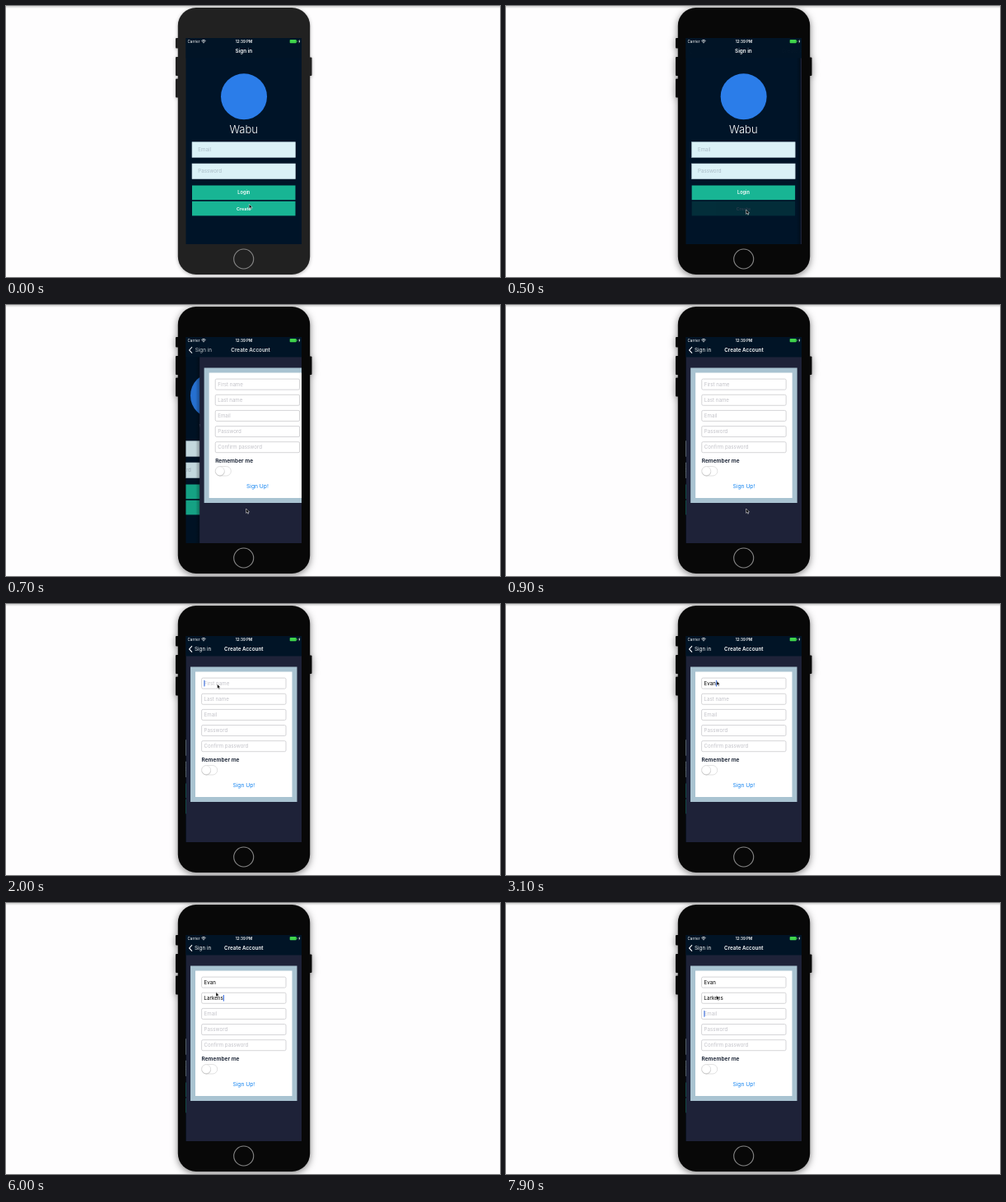
Recreate the animation shown at these times as an HTML page. Size 600 by 330 pixels, loop 8 s.

```html
<!DOCTYPE html>
<html lang="en">
<head>
<meta charset="utf-8">
<title>Sign up flow</title>
<style>
  html, body { margin: 0; width: 100%; height: 100%; overflow: hidden; background: #fefdfe; }
  svg { display: block; width: 100vw; height: 100vh; }
  text { font: 400 6.2px Inter, "Open Sans", sans-serif; }
  .mid { text-anchor: middle; }
  .bold { font-weight: 600; }
  .white { fill: #fff; }
  .hint { fill: #c2c2c8; }
  .status { font-size: 4.6px; fill: #fff; }
  .nav { font-size: 6.3px; fill: #fff; }
  .button { fill: #18b594; }
  .box { fill: #daf1f7; stroke: #b9cdd6; stroke-width: .6; }
  .input { fill: #fff; stroke: #c9c9cd; stroke-width: .8; }
  #phone { fill: #212121; filter: drop-shadow(0 1px 2px rgba(0,0,0,.3)); }
  #phone.active { fill: #080808; filter: drop-shadow(0 2px 4px rgba(0,0,0,.5)); }
</style>
</head>
<body>
<svg viewBox="0 0 600 330">
  <defs>
    <linearGradient id="top" x2="0" y2="1">
      <stop stop-color="#cfcfcf"/><stop offset="1" stop-color="#fefdfe"/>
    </linearGradient>
    <linearGradient id="edge">
      <stop stop-color="#000" stop-opacity="0"/><stop offset="1" stop-color="#000" stop-opacity=".3"/>
    </linearGradient>
    <clipPath id="screen"><rect x="218.5" y="39" width="140.5" height="251"/></clipPath>
  </defs>
  <rect width="600" height="3" fill="url(#top)"/>

  <g id="phone">
    <rect x="206" y="39" width="5" height="12.5" rx="1"/>
    <rect x="206" y="62" width="5" height="23" rx="1"/>
    <rect x="206" y="88.5" width="5" height="23" rx="1"/>
    <rect x="367" y="62.5" width="4.5" height="22.5" rx="1"/>
    <rect x="208.8" y="2" width="160.4" height="325" rx="22"/>
  </g>
  <circle cx="288.7" cy="308" r="12" fill="none" stroke="#858585" stroke-width="1.1"/>

  <g clip-path="url(#screen)">
    <g id="login">
      <rect x="218" y="39" width="142" height="252" fill="#001428"/>
      <circle cx="289" cy="110.3" r="28" fill="#2b7de9"/>
      <text class="mid white" x="288.7" y="155" style="font-size:13px;font-weight:300">Wabu</text>
      <rect class="box" x="226" y="165.7" width="125.5" height="18.6"/>
      <text x="233.3" y="177.2" fill="#a9bcc7">Email</text>
      <rect class="box" x="226" y="192" width="125.5" height="18.6"/>
      <text x="233.3" y="203.4" fill="#a9bcc7">Password</text>
      <rect class="button" x="226" y="218.5" width="125.5" height="17.6"/>
      <text class="mid bold white" x="288.8" y="229.3" style="font-size:5.6px">Login</text>
      <g id="create">
        <rect class="button" x="226" y="237.8" width="125.5" height="17.6"/>
        <text class="mid bold white" x="288.8" y="248.6" style="font-size:5.4px">Create</text>
      </g>
      <rect id="dim" x="218" y="39" width="142" height="252"/>
    </g>

    <g id="signup">
      <rect x="213.5" y="39" width="5" height="252" fill="url(#edge)"/>
      <rect x="218.5" y="39" width="142" height="252" fill="#1e2238"/>
      <rect x="224" y="76.5" width="129.5" height="164.5" fill="#a9c3d1"/>
      <rect x="230" y="82.5" width="117.5" height="152.5" fill="#fff"/>
      <g id="fields"></g>
      <rect id="caret" width="1.1" height="7.6" fill="#3a6fe2"/>
      <text class="bold" x="237.5" y="192.3" style="font-size:6.6px" fill="#101a2c">Remember me</text>
      <rect x="237.5" y="196.6" width="19.2" height="11.4" rx="5.7" fill="#fff" stroke="#dedede" stroke-width=".9"/>
      <circle cx="243.4" cy="202.9" r="5.6" fill="#000" opacity=".2"/>
      <circle cx="243.2" cy="202.2" r="5.4" fill="#fff" stroke="#d0d0d0" stroke-width=".4"/>
      <text class="mid" x="288.8" y="223" style="font-size:6.7px" fill="#1283f0">Sign Up!</text>
    </g>

    <rect x="218" y="39" width="142" height="24.5" fill="#011426"/>
    <text id="title" class="nav mid bold" x="288.8" y="57.3">Sign in</text>
    <path id="arrow" d="M226 51.2 L222.6 54.9 L226 58.6" fill="none" stroke="#fff" stroke-width="1.1"/>
    <text id="back" class="nav" x="229" y="57.3">Sign in</text>
    <text id="next" class="nav mid bold" x="288.8" y="57.3">Create Account</text>

    <text class="status" x="220.5" y="44.7">Carrier</text>
    <g fill="none" stroke="#fff" stroke-width=".8">
      <path d="M237.4 42.4 Q240 40.2 242.6 42.4 M238.4 43.6 Q240 42.3 241.6 43.6"/>
    </g>
    <circle class="white" cx="240" cy="44.7" r=".6"/>
    <text class="status mid bold" x="289" y="44.8">12:39 PM</text>
    <rect x="344.7" y="41" width="8" height="4.2" rx=".8" fill="#3fd44b"/>
    <rect x="353" y="42.3" width=".6" height="1.6" fill="#3fd44b"/>
    <path class="white" d="M356.7 40.8 L355.2 43.3 H356.1 L355.7 45.4 L357.3 42.8 H356.4 Z"/>
  </g>

  <path id="pointer" d="M0 0 V5.4 L1.3 4.3 L2.2 6.3 L3.1 5.9 L2.2 4 H3.9 Z" fill="#000" stroke="#fff" stroke-width=".5"/>
</svg>
<script>
  const LOOP = 8000;
  const $ = id => document.getElementById(id);
  const ramp = (t, from, to) => Math.min(1, Math.max(0, (t - from) / (to - from)));
  const smooth = x => x * x * (3 - 2 * x);
  const move = (el, x, y = 0) => el.setAttribute('transform', `translate(${x} ${y})`);

  const fields = [
    { hint: 'First name', value: 'Evan', start: 2400 },
    { hint: 'Last name', value: 'Larkens', start: 4900 },
    { hint: 'Email' }, { hint: 'Password' }, { hint: 'Confirm password' }
  ];
  const make = (tag, attrs) => {
    const el = document.createElementNS('http://www.w3.org/2000/svg', tag);
    for (const key in attrs) el.setAttribute(key, attrs[key]);
    return $('fields').appendChild(el);
  };
  fields.forEach((f, i) => {
    f.y = 96.6 + i * 19.15;
    make('rect', { class: 'input', x: 237.6, y: f.y - 6.5, width: 102.4, height: 13, rx: 1.6 });
    f.text = make('text', { x: 240.6, y: f.y + 2.2 });
  });

  // Pointer legs: start, end, x, y
  const legs = [
    [0, 0, 295.3, 241.3], [100, 300, 291.6, 248], [1000, 1800, 256.6, 97.6],
    [2900, 3000, 256, 93.8], [4000, 4100, 255, 108.6], [6100, 6300, 255.6, 112.6]
  ];
  function pointerAt(t) {
    let [, , x, y] = legs[0];
    for (const [from, to, nx, ny] of legs.slice(1)) {
      const k = smooth(ramp(t, from, to));
      x += (nx - x) * k;
      y += (ny - y) * k;
    }
    return [x, y];
  }

  function caretOpacity(t) {
    if (t < 1900) return 0;
    if (t < 4000) return 1;
    if (t < 4900) return 1 - ramp(t, 3999, 4100) + ramp(t, 4350, 4400);
    if (t < 6700) return 1 - ramp(t, 6020, 6100);
    if (t < 7500) return ramp(t, 6750, 6800) - ramp(t, 7000, 7100);
    return .4 + .6 * ramp(t, 7500, 7700);
  }

  function render(t) {
    $('phone').classList.toggle('active', t >= 100);
    $('create').setAttribute('opacity', 1 - .84 * (ramp(t, 200, 350) - ramp(t, 505, 620)));

    // Push from the right, the old page sliding at a third of the speed
    const rest = Math.pow(1 - ramp(t, 500, 1000), 4.15), done = 1 - rest;
    move($('login'), -42 * done);
    $('dim').setAttribute('opacity', .12 * done);
    move($('signup'), 140.5 * rest);
    $('signup').setAttribute('visibility', done ? 'visible' : 'hidden');
    move($('title'), -50 * done);
    $('title').setAttribute('opacity', Math.max(0, 1 - 1.3 * done));
    move($('back'), 50 * rest * rest);
    $('back').setAttribute('opacity', done * done);
    $('arrow').setAttribute('opacity', done);
    move($('next'), 70 * rest);
    $('next').setAttribute('opacity', done);

    for (const f of fields) {
      const count = f.value && t >= f.start ? Math.floor((t - f.start) / 100) + 1 : 0;
      f.text.textContent = count ? f.value.slice(0, count) : f.hint;
      f.text.setAttribute('class', count ? '' : 'hint');
      f.width = count ? f.text.getComputedTextLength() + .2 : 0;
    }
    const focus = fields[t < 3500 ? 0 : t < 7500 ? 1 : 2];
    const caret = $('caret');
    caret.setAttribute('x', 240.4 + focus.width);
    caret.setAttribute('y', focus.y - 3.8);
    caret.setAttribute('opacity', caretOpacity(t));

    move($('pointer'), ...pointerAt(t));
  }

  const begin = performance.now();
  function tick() {
    render((performance.now() - begin) % LOOP);
    requestAnimationFrame(tick);
  }
  tick();
</script>
</body>
</html>
```
